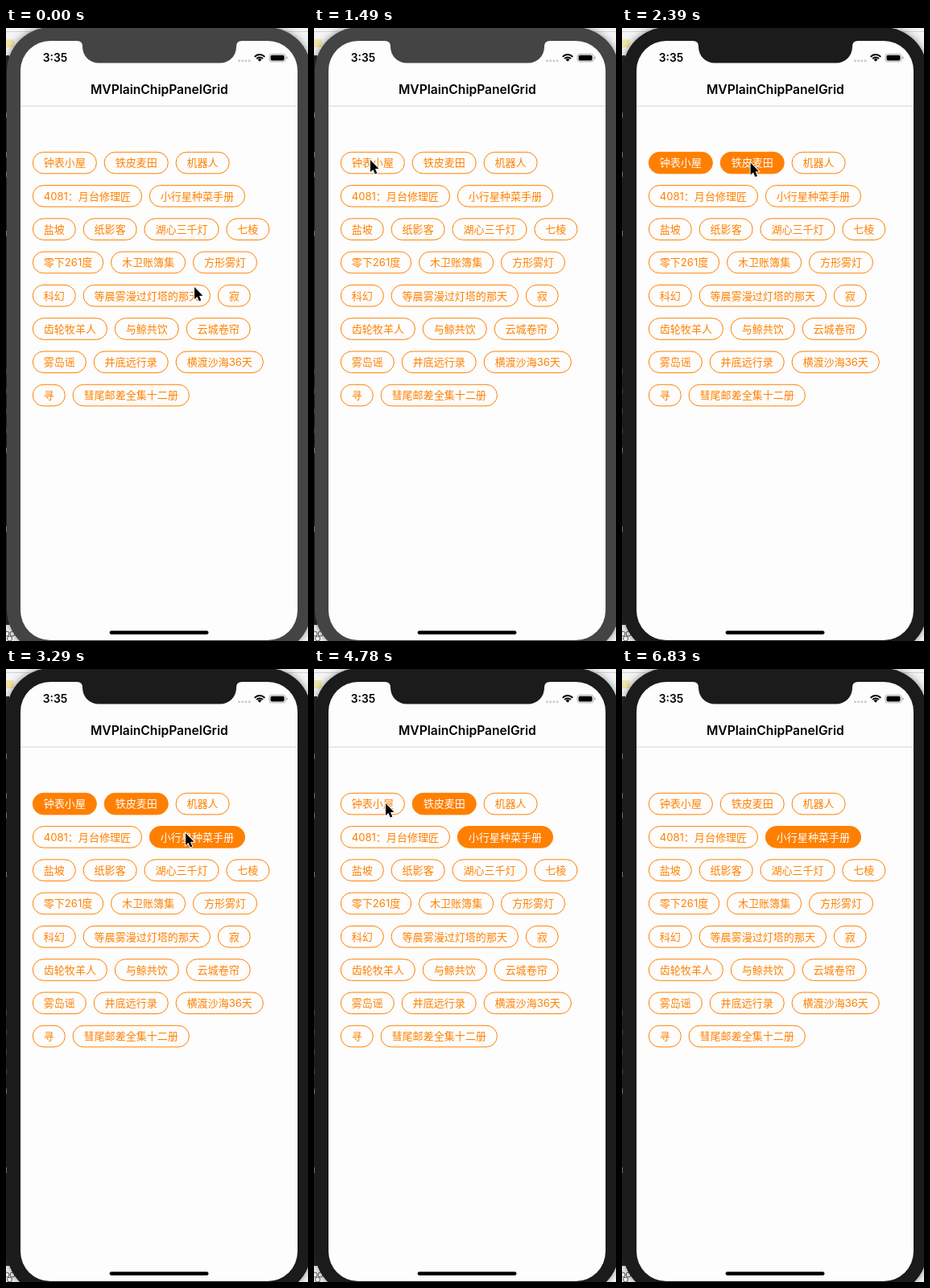
Recreate the animation shown at these times as an HTML page with a canvas. Size 375 by 762 pixels, loop 6.93 s.

```html
<!DOCTYPE html>
<html lang="zh-CN">
<head>
<meta charset="utf-8">
<title>Tag list</title>
<style>
html, body { margin: 0; width: 100%; height: 100%; overflow: hidden; background: #f5f5f5; }
canvas { display: block; width: 375px; height: 762px; }
</style>
</head>
<body>
<canvas id="stage"></canvas>
<script>
const W = 375, H = 762, LOOP = 6930;
const TICK = 148.4; // the picture moves on in even steps
const FOCUS_TICK = 11; // the window comes to the front
const ORANGE = '#ff8000';
const TAG_FONT = '13.05px Inter, "Noto Sans CJK SC", "Noto Sans CJK", sans-serif';
const canvas = document.getElementById('stage');
const ratio = window.devicePixelRatio || 1;
canvas.width = W * ratio;
canvas.height = H * ratio;
const ctx = canvas.getContext('2d');
ctx.scale(ratio, ratio);

const rows = [
  '钟表小屋 铁皮麦田 机器人',
  '4081：月台修理匠 小行星种菜手册',
  '盐坡 纸影客 湖心三千灯 七棱',
  '零下261度 木卫账簿集 方形雾灯',
  '科幻 等晨雾漫过灯塔的那天 寂',
  '齿轮牧羊人 与鲸共饮 云城卷帘',
  '雾岛谣 井底远行录 横渡沙海36天',
  '寻 彗尾邮差全集十二册'
].map(row => row.split(' '));

// Each click toggles one tag.
const clicks = [
  { tick: 12, label: '钟表小屋' },
  { tick: 16, label: '铁皮麦田' },
  { tick: 22, label: '小行星种菜手册' },
  { tick: 32, label: '钟表小屋' },
  { tick: 36, label: '铁皮麦田' }
];

// The pointer rests between these moves and leaves the stage at the end.
const start = { x: 234, y: 322 };
const moves = [
  { from: 0, to: 1, x: 226, y: 316 },
  { from: 2, to: 7, x: 92, y: 159 },
  { from: 7, to: 9, x: 58, y: 166 },
  { from: 9, to: 10, x: 70, y: 164 },
  { from: 12, to: 17, x: 170, y: 168 },
  { from: 17, to: 19, x: 223, y: 204 },
  { from: 23, to: 31, x: 89, y: 167 },
  { from: 32, to: 36, x: 150, y: 170 },
  { from: 36, to: 39, x: 240, y: 204 },
  { from: 39, to: 42, x: 311, y: 701 },
  { from: 42, to: 43, x: 400, y: 800 }
];

const clamp = v => Math.min(1, Math.max(0, v));
const ease = v => v * v * (3 - 2 * v);

function pointerAt(tick) {
  return moves.reduce((p, m) => {
    const k = ease(clamp((tick - m.from) / (m.to - m.from)));
    return { x: p.x + (m.x - p.x) * k, y: p.y + (m.y - p.y) * k };
  }, start);
}

function isSelected(label, tick) {
  return clicks.filter(c => c.label === label && c.tick <= tick).length % 2 === 1;
}

function seeded(seed) {
  return () => (seed = seed * 16807 % 2147483647) / 2147483647;
}

function rect(x, y, w, h, color) {
  ctx.fillStyle = color;
  ctx.fillRect(x, y, w, h);
}

function round(x, y, w, h, r, color) {
  ctx.beginPath();
  ctx.roundRect(x, y, w, h, r);
  ctx.fillStyle = color;
  ctx.fill();
}

function text(str, x, y, font, color) {
  ctx.font = font;
  ctx.fillStyle = color;
  ctx.textAlign = 'center';
  ctx.fillText(str, x, y);
}

function drawDesktop() {
  rect(0, 0, W, H, '#f5f5f5');
  rect(0, 4, W, 1, '#d2d2d2');
  round(-4, 14, 14, 10, 2, '#f3e6a6');
  rect(0, 34, 4, 708, '#27282c');
  // Edge of an editor, almost hidden by the phone.
  const random = seeded(7);
  for (let y = 105; y < 670; y += 24.5) {
    const red = y > 420 && y < 510;
    if (red || random() < 0.35) rect(0, y, 1.2, 7, red ? '#8a4040' : '#909090');
  }
  ctx.strokeStyle = '#555';
  ctx.lineWidth = 1;
  for (let i = 0; i < 3; i++) {
    ctx.beginPath();
    ctx.arc(1 + i * 3.5, 753 + (i % 2) * 6, 3, 0, Math.PI * 2);
    ctx.stroke();
  }
}

function drawPhone(bezel) {
  ctx.save();
  ctx.shadowColor = 'rgba(0, 0, 0, 0.45)';
  ctx.shadowBlur = 10 * ratio;
  round(1, -1, 378, 779, 55, bezel);
  ctx.restore();
  round(18, 16, 344, 745, 37, '#fdfdfd');
  ctx.beginPath();
  ctx.moveTo(88, 15);
  ctx.lineTo(88, 16);
  ctx.quadraticCurveTo(95, 16, 95, 23);
  ctx.arcTo(95, 43.6, 115, 43.6, 20);
  ctx.arcTo(286, 43.6, 286, 23, 20);
  ctx.lineTo(286, 23);
  ctx.quadraticCurveTo(286, 16, 293, 16);
  ctx.lineTo(293, 15);
  ctx.fillStyle = bezel;
  ctx.fill();
  rect(18, 96.5, 344, 1, '#d3d3d5');
  round(128.6, 749.2, 122.9, 4.6, 2.3, '#000');
}

function drawStatus() {
  text('3:35', 61, 42.3, '600 13.8px Inter, sans-serif', '#000');
  for (let i = 0; i < 4; i++) {
    round(288 + i * 4.2, 39.2, 3, 3, 1.5, '#cbcbcb');
  }
  const fan = r => {
    ctx.beginPath();
    ctx.arc(315, 41.7, r, -Math.PI * 0.76, -Math.PI * 0.24);
  };
  ctx.strokeStyle = ctx.fillStyle = '#000';
  ctx.lineWidth = 2;
  for (const r of [8.6, 5.3]) {
    fan(r);
    ctx.stroke();
  }
  fan(3.4);
  ctx.lineTo(315, 41.7);
  ctx.fill();
  ctx.beginPath();
  ctx.roundRect(327, 32.3, 20, 9.6, 2.8);
  ctx.strokeStyle = '#a5a5a5';
  ctx.lineWidth = 0.9;
  ctx.stroke();
  round(328.5, 33.8, 17, 6.6, 1.6, '#000');
  round(348.2, 35.6, 1.3, 3, 0.7, '#a5a5a5');
}

function drawTag(label, x, mid, w, on) {
  ctx.beginPath();
  ctx.roundRect(x + 0.3, mid - 13.3, w - 0.6, 26.6, 13.3);
  ctx.fillStyle = ORANGE;
  if (on) ctx.fill();
  ctx.strokeStyle = ORANGE;
  ctx.lineWidth = 1;
  ctx.stroke();
  text(label, x + w / 2, mid + 4.8, TAG_FONT, on ? '#fff' : ORANGE);
}

function drawTags(tick) {
  ctx.font = TAG_FONT;
  rows.forEach((row, r) => {
    let x = 33;
    for (const label of row) {
      const w = ctx.measureText(label).width + 27.5;
      drawTag(label, x, 167.6 + r * 41.28, w, isSelected(label, tick));
      x += w + 9.2;
    }
  });
}

function drawPointer({ x, y }) {
  ctx.save();
  ctx.translate(x, y);
  const arrow = new Path2D('M0 0V15L3.4 12L5.8 17.5L8.3 16.4L6 11L10.4 10.7Z');
  ctx.strokeStyle = '#fff';
  ctx.lineWidth = 1.8;
  ctx.stroke(arrow);
  ctx.fillStyle = '#000';
  ctx.fill(arrow);
  ctx.restore();
}

function frame(now) {
  const tick = Math.floor((now % LOOP) / TICK);
  drawDesktop();
  drawPhone(tick >= FOCUS_TICK ? '#1b1b1b' : '#444444');
  drawStatus();
  text('MVPlainChipPanelGrid', 190.3, 82.2, '600 15.6px Inter, sans-serif', '#000');
  drawTags(tick);
  drawPointer(pointerAt(tick));
  requestAnimationFrame(frame);
}
requestAnimationFrame(frame);
</script>
</body>
</html>
```
